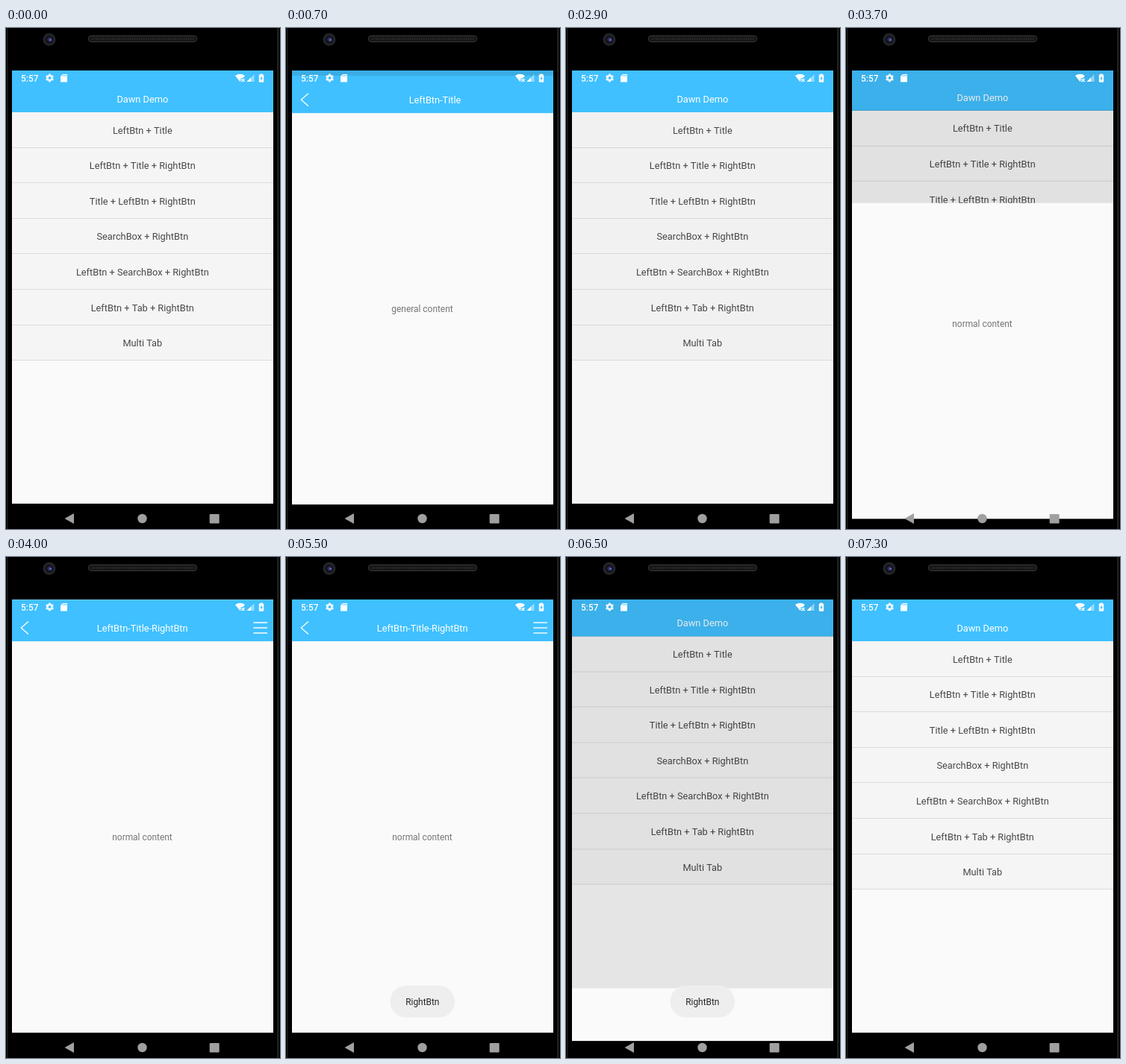
Write an HTML page with a canvas that moves like this. It is 367 px wide and 672 px high and loops after 8 s.

```html
<!DOCTYPE html>
<html lang="en">
<head>
<meta charset="utf-8">
<title>Navigation bar demo</title>
<style>
html, body { margin: 0; width: 100%; height: 100%; overflow: hidden; background: #000; }
canvas { display: block; }
</style>
</head>
<body>
<canvas id="stage" width="367" height="672"></canvas>
<script>
const ctx = document.getElementById('stage').getContext('2d');
const LOOP = 8000, STEP = 100, SLIDE = 425;
const LEFT = 8, TOP = 57, WIDTH = 350, BOTTOM = 638, BAR = 113, WINDOW = 615;
const BLUE = '#40c0ff', ROW = 47.6;
const ROWS = ['LeftBtn + Title', 'LeftBtn + Title + RightBtn', 'Title + LeftBtn + RightBtn',
  'SearchBox + RightBtn', 'LeftBtn + SearchBox + RightBtn', 'LeftBtn + Tab + RightBtn', 'Multi Tab'];
const PAGES = [
  { title: 'LeftBtn-Title', x: 199.5, body: 'general content', open: 387, close: 2479 },
  { title: 'LeftBtn-Title-RightBtn', x: 182.7, body: 'normal content', open: 3602, close: 6361, menu: true }
];
const RIPPLES = [[24, 2400], [341, 4800], [24, 6200]];

const clamp = v => Math.max(0, Math.min(1, v));
const cubic = (a, b, c, d, s) =>
  a * (1 - s) ** 3 + 3 * b * s * (1 - s) ** 2 + 3 * c * s * s * (1 - s) + d * s ** 3;

// y on a Bezier segment for a given x
function bezier(x, [x0, y0, x1, y1, x2, y2, x3, y3]) {
  let lo = 0, hi = 1;
  for (let i = 0; i < 30; i++) {
    const mid = (lo + hi) / 2;
    if (cubic(x0, x1, x2, x3, mid) < x) lo = mid; else hi = mid;
  }
  return cubic(y0, y1, y2, y3, lo);
}
const slideEase = x => bezier(x, [0, 0, .4, 0, .2, 1, 1, 1]);
const dimEase = x => bezier(x, [0, 0, .33, 0, 1, 1, 1, 1]);
const clipEase = x => x < 1 / 6
  ? bezier(x, [0, 0, .05, 0, .1333, .06, 1 / 6, .4])
  : bezier(x, [1 / 6, .4, .2083, .82, .25, 1, 1, 1]);

function rect(x, y, w, h, color) {
  ctx.fillStyle = color;
  ctx.fillRect(x, y, w, h);
}
function disc(x, y, r, color) {
  ctx.fillStyle = color;
  ctx.beginPath();
  ctx.arc(x, y, r, 0, 7);
  ctx.fill();
}
function pill(x, y, w, h, r, color) {
  ctx.fillStyle = color;
  ctx.beginPath();
  ctx.roundRect(x, y, w, h, r);
  ctx.fill();
}
function trace(points) {
  ctx.beginPath();
  for (let i = 0; i < points.length; i += 2) ctx.lineTo(points[i], points[i + 1]);
}
function polygon(color, ...points) {
  ctx.fillStyle = color;
  trace(points);
  ctx.fill();
}
function line(color, width, ...points) {
  ctx.strokeStyle = color;
  ctx.lineWidth = width;
  trace(points);
  ctx.stroke();
}
function text(str, x, y, size, color, weight = 400) {
  ctx.font = `${weight} ${size}px Roboto, sans-serif`;
  ctx.textAlign = 'center';
  ctx.fillStyle = color;
  ctx.fillText(str, x, y + size * .36);
}
function clipped(y, h, draw) {
  ctx.save();
  ctx.beginPath();
  ctx.rect(LEFT, y, WIDTH, h);
  ctx.clip();
  draw();
  ctx.restore();
}

function drawPhone() {
  rect(0, 0, 367, 672, '#000');
  rect(1, 0, 1.5, 672, '#1d1d1d');
  rect(363, 0, 2.5, 672, '#202020');
  disc(58, 15.5, 8.5, '#242528');
  disc(58, 15.5, 5.5, '#12131c');
  disc(58.5, 15.5, 3, '#2b2d5c');
  disc(59.5, 16, 1.3, '#6f74c0');
  pill(110, 10, 146, 9, 4.5, '#3a3a3a');
  pill(111, 11, 144, 7, 3.5, '#161616');
  for (let x = 115; x < 252; x += 3) rect(x, 13, 1.5, 3, '#2a2a2a');
}

function drawNavIcons() {
  const gray = '#a0a0a0';
  polygon(gray, 78.5, 658, 91, 651, 91, 665);
  disc(182.5, 658, 6.2, gray);
  pill(272.7, 652, 13, 12.5, 1, gray);
}

function drawStatusIcons() {
  text('5:57', 31.7, 67.3, 11.9, '#fff', 500);
  ctx.strokeStyle = '#fff';
  ctx.lineWidth = 2.2;
  ctx.beginPath();
  ctx.arc(58.5, 67, 3, 0, 7);
  ctx.stroke();
  for (let i = 0; i < 6; i++) {
    const a = (i + .5) * Math.PI / 3, c = Math.cos(a), s = Math.sin(a);
    line('#fff', 2.6, 58.5 + 3 * c, 67 + 3 * s, 58.5 + 5.4 * c, 67 + 5.4 * s);
  }
  polygon('#fff', 73, 65, 76, 62, 82, 62, 82, 72.5, 73, 72.5);
  for (const x of [76, 78, 80]) rect(x, 63, 1, 2, BLUE);

  ctx.fillStyle = '#fff';
  ctx.beginPath();
  ctx.moveTo(313.5, 72);
  ctx.lineTo(307, 64);
  ctx.quadraticCurveTo(313.5, 59.5, 320, 64);
  ctx.fill();
  rect(314.5, 67, 6, 6, BLUE);
  line('#fff', 1.2, 315.5, 68, 319.5, 72);
  line('#fff', 1.2, 319.5, 68, 315.5, 72);

  polygon('rgba(255,255,255,.45)', 322.5, 72, 332.5, 62, 332.5, 72);
  polygon('#fff', 322.5, 72, 328, 66.5, 328, 72);

  rect(340.5, 61.5, 3, 2, '#fff');
  pill(338.8, 62.5, 6.4, 10.2, 1, '#fff');
  polygon(BLUE, 342.5, 64, 340.3, 68.2, 341.7, 68.2, 341.5, 71.2, 343.8, 67, 342.5, 67);
}

function drawHeader(title, x) {
  rect(LEFT, TOP, WIDTH, BAR - TOP, BLUE);
  text(title, x, 95.3, 12.77, '#fff');
}

function drawList(shift, dim, settling) {
  clipped(TOP, 672 - TOP, () => {
    ctx.translate(0, shift);
    rect(LEFT, BAR, WIDTH, BOTTOM - BAR, '#fafafa');
    rect(LEFT, BAR, WIDTH, ROW * ROWS.length, '#f5f5f5');
    ROWS.forEach((label, i) => {
      const y = BAR + ROW * i;
      rect(LEFT, Math.round(y + ROW) - 1, WIDTH, 1, '#dcdcdc');
      text(label, 182.8, y + 24, 12.77, '#484848');
    });
    if (settling) rect(LEFT, BAR, WIDTH, BOTTOM - BAR, 'rgba(0,0,0,.015)');
    drawHeader('Dawn Demo', 182.8);
    rect(LEFT, TOP, WIDTH, BOTTOM - TOP, `rgba(0,0,0,${dim})`);
  });
}

function drawRipples(t) {
  clipped(77, BAR - 77, () => {
    for (const [x, start] of RIPPLES) {
      const age = (t - start) / 400;
      if (age >= 0 && age < 1) disc(x, 95, 20.7, `rgba(0,0,0,${.12 * (1 - age)})`);
    }
  });
}

function drawPage(page, offset, cut, t) {
  const y = TOP + offset + cut;
  clipped(y, Math.max(0, 672 - y), () => {
    ctx.translate(0, offset);
    rect(LEFT, TOP, WIDTH, BOTTOM - TOP, '#fafafa');
    drawHeader(page.title, page.x);
    drawRipples(t);
    line('#fff', 1.3, 30, 86.5, 20.3, 95, 30, 103.5);
    if (page.menu) for (const my of [88, 95, 102]) line('#fff', 1.4, 331.5, my, 350, my);
    text(page.body, 182.5, 376, 11.92, '#757575');
  });
}

function drawToast(t) {
  const alpha = t < 6800
    ? 1 - (1 - clamp((t - 4950) / 500)) ** 2
    : 1 - clamp((t - 6800) / 500) ** 2;
  if (alpha <= 0) return;
  ctx.globalAlpha = alpha;
  pill(139.5, 575, 86.5, 42.5, 21, '#eee');
  text('RightBtn', 182.8, 597.2, 11.92, '#252525');
  ctx.globalAlpha = 1;
}

function render(t) {
  drawPhone();
  const page = PAGES.find(p => t > p.open && t < p.close + SLIDE);
  let shift = 0, dim = 0, offset, cut;
  if (page) {
    const closing = t > page.close;
    const x = clamp((t - (closing ? page.close : page.open)) / SLIDE);
    const away = closing ? slideEase(x) : 1 - slideEase(x);
    offset = .041 * WINDOW * away;
    shift = -.019 * WINDOW * (1 - away);
    cut = .959 * WINDOW * (closing ? clipEase(x) : 1 - clipEase(x));
    dim = .1 * (closing ? 1 - dimEase(x) : clamp((t - page.open) / 117));
  }
  drawList(shift, dim, t >= 2900 && t < 3700);
  if (page) drawPage(page, offset, cut, t);
  drawStatusIcons();
  drawNavIcons();
  drawToast(t);
}

const begin = performance.now();
function tick() {
  const t = (performance.now() - begin) % LOOP;
  render(Math.floor(t / STEP) * STEP);
  requestAnimationFrame(tick);
}
tick();
</script>
</body>
</html>
```
